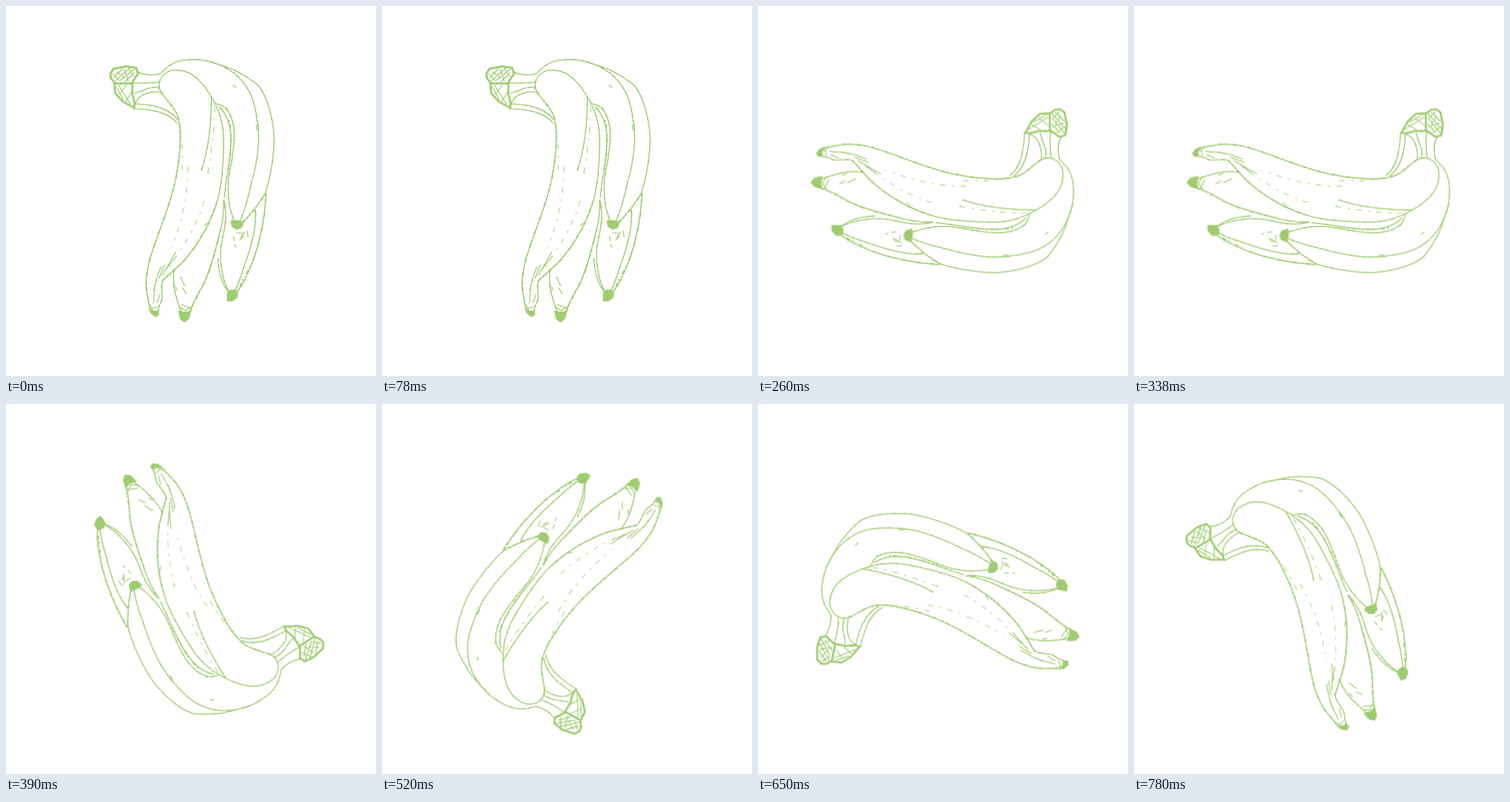
An HTML page for the animation above (0.91 s loop, 454 by 454 pixels).

```html
<!DOCTYPE html>
<html lang="en">
<head>
<meta charset="utf-8">
<title>Spinning bananas</title>
<style>
  html, body { margin: 0; width: 100%; height: 100%; overflow: hidden; background: #fff; }
  svg { display: block; width: 454px; height: 454px; }
  #bunch { transform-origin: 227px 226px; }
  g { fill: none; stroke: #a0cc70; stroke-linecap: round; stroke-linejoin: round; }
  .line { stroke-width: 1.15; }
  .rough { stroke-width: 1.8; stroke-dasharray: 2 3 5 4 1 3; stroke-linecap: butt; }
  .bold { stroke-width: 2.5; }
  .faint { stroke-width: .9; stroke-dasharray: 6 8 2 9; }
  .tip { fill: #a0cc70; stroke-width: 1; }
</style>
</head>
<body>
<svg viewBox="0 0 454 454">
  <g id="bunch">
    <g class="line" id="outline">
      <!-- front banana -->
      <path d="M188 100C190 109 202 118 209 131C217 148 214 185 208 213C201 248 183 286 175 316C170 340 172 348 175 362C175 372 179 378 184 381"/>
      <path d="M188 100C187 90 192 83 203 79C224 76 238 89 250 108C262 127 267 145 267 163C267 195 264 226 258 243C248 274 232 297 218 313C206 325 196 333 192 337C189 346 193 354 191 361C188 367 186 372 187 379"/>
      <!-- right banana -->
      <path d="M162 81C172 86 182 85 190 83C198 73 208 67 222 66C232 65 244 66 253 69C273 75 288 86 298 104C306 118 310 145 310 165C309 190 303 212 299 226C295 245 291 255 287 264"/>
      <path d="M246 67C258 71 270 74 281 79C292 85 301 90 309 97C319 108 327 132 329 160C329 188 323 216 318 230C311 242 300 256 290 266"/>
      <path d="M257 120C268 121 275 130 278 142C283 160 278 178 277 190C272 212 272 222 273 236C275 250 278 260 281 266"/>
      <path d="M262 124C270 132 275 145 276 160C277 182 270 210 268 234"/>
      <!-- back bananas -->
      <path d="M267 238C268 255 265 270 261 283C255 308 248 334 238 349C233 358 229 365 226 375"/>
      <path d="M206 325C204 340 207 352 211 364L215 375"/>
      <path d="M268 240C271 255 270 268 266 283C262 300 263 315 265 325C267 338 271 346 274 352M260 310C261 330 266 342 273 351"/>
      <path d="M319 230C318 258 312 288 303 313C296 330 291 342 284 350"/>
      <path d="M306 250C308 270 300 298 293 317C288 335 284 342 281 350"/>
      <!-- stalks -->
      <path d="M156 94C168 95 178 95 188 93M158 107C170 104 176 98 188 100M159 119C163 108 176 105 190 105"/>
      <path d="M158 120C176 121 198 123 210 139M157 126C180 127 199 130 210 144"/>
      <!-- ridge of the front banana -->
      <path d="M252 112C252 143 249 174 240 201"/>
    </g>
    <use href="#outline" class="rough"/>
    <g class="rough">
      <path d="M188 101C190 109 202 118 209 131C217 148 214 185 208 213C201 248 183 286 175 316C170 340 172 348 175 362"/>
      <path d="M258 243C248 274 232 297 218 313L192 337M318 230C311 242 300 256 290 266M261 283C255 308 248 334 238 349L226 375"/>
      <path d="M319 232C318 258 312 288 303 313L284 350M274 140C277 160 276 178 273 200"/>
    </g>
    <g class="bold">
      <path d="M128 83L132 77 148 74 160 76 162 83 158 89 154 95 134 95 129 89Z"/>
      <path d="M133 95L134 107 143 117 157 125 158 120 155 108 155 95"/>
    </g>
    <g class="line">
      <path d="M132 88L143 77M134 92L152 76M139 92L158 77M146 93L157 82M131 83L138 90M145 78L150 92M150 76L157 87M136 81L146 88"/>
      <path d="M135 99L144 115M138 97L153 121M139 108L148 97M147 117L154 106"/>
      <path d="M176 366L182 376M178 371L186 369M189 354L185 364M182 347L181 365M184 338L182 348"/>
      <path d="M212 369L220 374 227 369M215 366L226 371M273 351L281 348M277 263L291 264"/>
      <path d="M216 336L219 343M217 346L221 353M214 333L216 335M208 344L210 349"/>
      <path d="M279 283L280 288M283 278L290 279M288 284L293 277M296 276L297 283M281 293L282 296M292 282L287 287"/>
      <path d="M247 204L249 205M244 270L246 267M247 266L247 267M279 97L282 100M270 125L272 127M305 252L307 255"/>
      <path d="M307 146L308 152M309 144L310 154"/>
    </g>
    <g class="faint">
      <path d="M256 124C256 150 253 176 248 203"/>
      <path d="M213 145C217 165 217 185 216 203M223 198C224 235 214 268 204 296"/>
      <path d="M243 240C235 268 217 298 195 326"/>
    </g>
    <g class="line">
      <path d="M208 302C202 314 197 322 192 330M209 307L194 326M190 320C186 331 182 340 182 350M194 318L188 334M240 199V202"/>
    </g>
    <g class="tip">
      <path d="M276 264L283 263 291 266 289 272 283 274 278 271Z"/>
      <path d="M212 374L220 376 227 374 224 384 219 388 214 384Z"/>
      <path d="M272 351L277 348 284 350 284 357 278 362 272 362Z"/>
      <path d="M176 371L181 375 186 374 187 379 183 381 178 377Z"/>
    </g>
  </g>
</svg>
<script>
  const STEP = 130;
  // turn in degrees, shift x, shift y
  const poses = [
    [0, 0, 0], [28.5, -.9, -1.7], [90.2, -.2, -1], [146.8, 1, 1],
    [209.6, -.1, 2.1], [280.7, 9.7, 22], [330.1, -5.4, 17.7]
  ];
  const toFrame = ([turn, x, y], i) => ({
    transform: `translate(${x}px, ${y}px) rotate(${turn}deg)`,
    offset: i / poses.length,
    easing: 'steps(1, end)'
  });
  const frames = poses.map(toFrame);
  frames.push({ ...frames[0], offset: 1 });
  document.getElementById('bunch').animate(frames, {
    duration: STEP * poses.length,
    iterations: Infinity
  });
</script>
</body>
</html>
```
